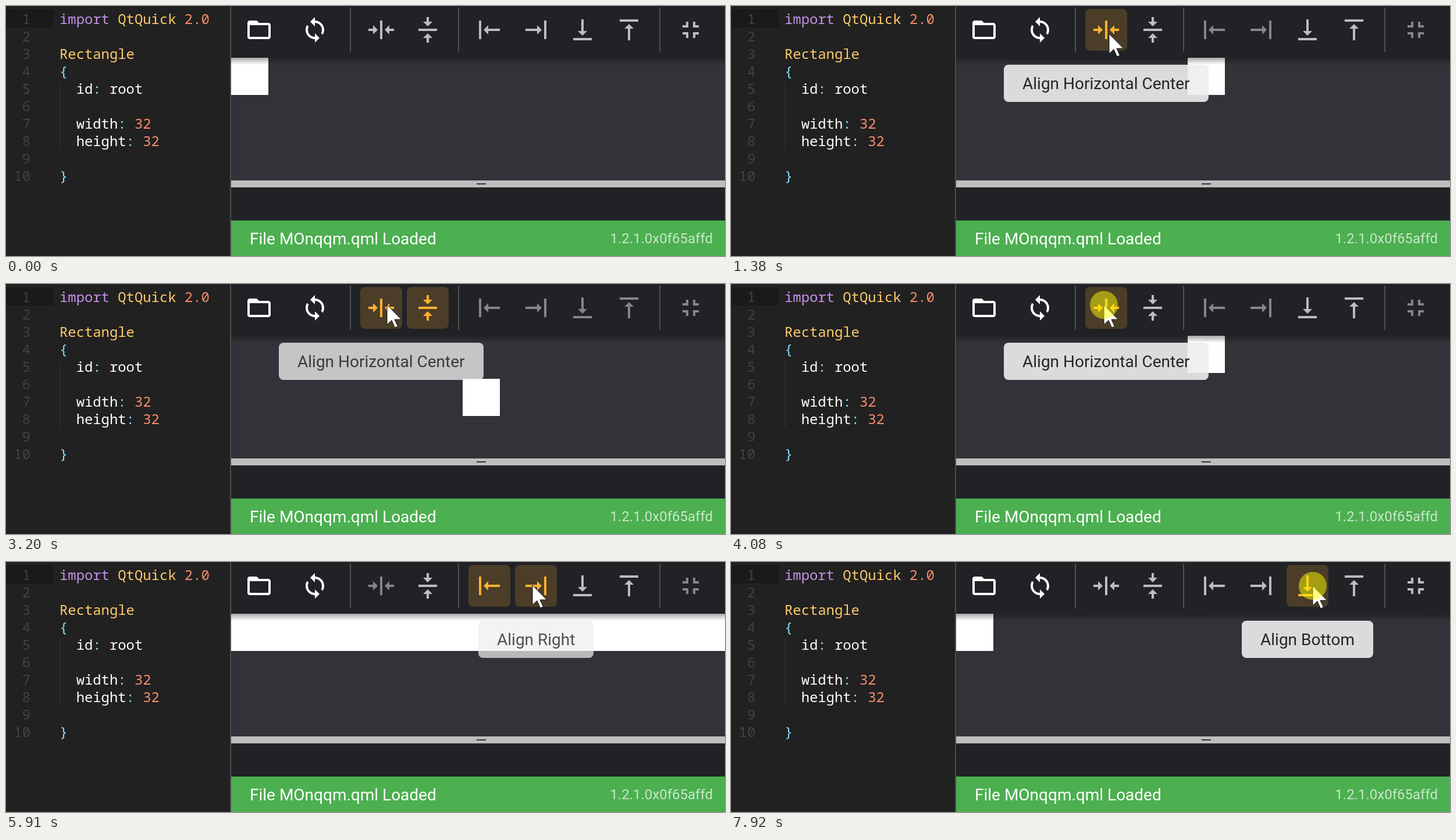
Write an HTML page with a canvas that moves like this. It is 1236x430 px and loops after 8000 ms.

```html
<!DOCTYPE html>
<html lang="en">
<head>
<meta charset="utf-8">
<title>Anchor toolbar</title>
<style>
  html, body { margin: 0; height: 100%; overflow: hidden; background: #212121; }
  canvas { display: block; }
</style>
</head>
<body>
<canvas id="stage" width="1236" height="430"></canvas>
<script>
const ctx = document.getElementById('stage').getContext('2d');
const LOOP = 8000, ENTER = 260, FRAME = 95.7;
const TRAVEL = 200, HOLD = 190, LAG = 280, FADE = 130;
const MID = 41; // toolbar centre line

const centerIcon = 'M8 19h3v4h2v-4h3l-4-4-4 4zm8-14h-3V1h-2v4H8l4 4 4-4zM4 11v2h16v-2H4z';
const edgeIcon = 'M16 13h-3V3h-2v10H8l4 4 4-4zM4 19v2h16v-2H4z';
const folderIcon = 'M20 6h-8l-2-2H4c-1.1 0-1.99.9-1.99 2L2 18c0 1.1.9 2 2 2h16c1.1 0 2-.9 2-2V8c0-1.1-.9-2-2-2zm0 12H4V8h16v10z';
const syncIcon = 'M12 4V1L8 5l4 4V6c3.31 0 6 2.69 6 6 0 1.01-.25 1.97-.7 2.8l1.46 1.46C19.54 15.03 20 13.57 20 12c0-4.42-3.58-8-8-8zm0 14c-3.31 0-6-2.69-6-6 0-1.01.25-1.97.7-2.8L5.24 7.74C4.46 8.97 4 10.43 4 12c0 4.42 3.58 8 8 8v3l4-4-4-4v3z';
const fillIcon = 'M5 16h3v3h2v-5H5v2zm3-8H5v2h5V5H8v3zm6 11h2v-3h3v-2h-5v5zm2-11V5h-2v5h5V8h-3z';
const arrow = new Path2D('M0 0V34L8 26.5L13.5 39L18.5 37L13 25H24.5Z');

// turn: quarter turns of the icon
const buttons = {
  open: { x: 435, icon: folderIcon, bright: true },
  sync: { x: 531, icon: syncIcon, bright: true },
  hc: { x: 645, icon: centerIcon, turn: 1, label: 'Align Horizontal Center' },
  vc: { x: 725, icon: centerIcon, label: 'Align Vertical Center' },
  left: { x: 831, icon: edgeIcon, turn: 1, label: 'Align Left' },
  right: { x: 911, icon: edgeIcon, turn: -1, label: 'Align Right' },
  bottom: { x: 991, icon: edgeIcon, label: 'Align Bottom' },
  top: { x: 1071, icon: edgeIcon, turn: 2 },
  fill: { x: 1177, icon: fillIcon }
};
for (const b of Object.values(buttons)) b.shape = new Path2D(b.icon);

// Pointer stops: place, offset from its centre, arrival, press
const visits = [
  ['view', 44, 188, ENTER],
  ['hc', 5, 7, 640, 810],
  ['vc', -5, -8, 1780, 2150],
  ['view', -140, 231, 2560],
  ['hc', 10, -5, 3200],
  ['vc', -5, -1, 3440, 3500],
  ['hc', -4, -5, 3890, 4080],
  ['left', 15, -20, 4660, 4850],
  ['right', -6, -1, 5430, 5520],
  ['left', 19, 1, 6110, 6285],
  ['right', -8, 4, 6810, 6955],
  ['bottom', 9, 0, 7630, 7910]
].map(([name, dx, dy, arrive, press]) => ({
  name, arrive, press, y: MID + dy,
  x: dx + (name === 'view' ? 817 : buttons[name].x)
}));

const W = '#ffffff', P = '#c792ea', Y = '#ffcb6b', O = '#f78c6c', B = '#89ddff';
const code = [
  [['import ', P], ['QtQuick ', Y], ['2.0', O]],
  [],
  [['Rectangle', Y]],
  [['{', B]],
  [['  id', W], [': ', B], ['root', W]],
  [],
  [['  width', W], [': ', B], ['32', O]],
  [['  height', W], [': ', B], ['32', O]],
  [],
  [['}', B]]
];

const clamp = v => Math.max(0, Math.min(1, v));
const smooth = k => k * k * (3 - 2 * k);

function box(x, y, w, h, color) {
  ctx.fillStyle = color;
  ctx.fillRect(x, y, w, h);
}

function roundBox(x, y, w, h, color) {
  ctx.fillStyle = color;
  ctx.beginPath();
  ctx.roundRect(x, y, w, h, 8);
  ctx.fill();
}

function text(str, x, y, color, font, align = 'left') {
  ctx.font = font;
  ctx.textAlign = align;
  ctx.fillStyle = color;
  ctx.fillText(str, x, y);
}

// Every press toggles its button
const toggled = (name, t) =>
  visits.filter(v => v.name === name && v.press <= t).length % 2 === 1;

function pointer(t) {
  let { x, y } = visits[0];
  for (const v of visits.slice(1)) {
    const k = smooth(clamp((t - v.arrive) / TRAVEL + 1));
    x += (v.x - x) * k;
    y += (v.y - y) * k;
  }
  return [x, y];
}

function drawEditor() {
  const mono = '500 23.88px "Noto Sans Mono", monospace';
  box(0, 0, 385, 430, '#212121');
  box(0, 6, 82, 31, '#1a1a1a');
  box(92, 132, 2, 115, '#2b2b2b');
  code.forEach((line, i) => {
    const y = 31 + 30 * i;
    text(i + 1, 42, y, '#424242', mono, 'right');
    let x = 92;
    for (const [str, color] of line) {
      text(str, x, y, color, mono);
      x += ctx.measureText(str).width;
    }
  });
  box(385, 0, 2, 430, '#4c4c4d');
}

function drawView(set) {
  box(387, 89, 849, 211, '#323338');
  const x = set.hc ? 785 : set.right && !set.left ? 1183 : 387;
  const w = set.left && set.right ? 860 : 64;
  box(x, set.vc ? 163 : 89, w, 64, '#fff');
  const shade = ctx.createLinearGradient(0, 89, 0, 101);
  shade.addColorStop(0, 'rgba(0,0,0,.34)');
  shade.addColorStop(1, 'rgba(0,0,0,0)');
  box(387, 89, 849, 12, shade);
  box(387, 300, 849, 12, '#bdbdbd');
  box(809, 305, 16, 2, '#323338');
  box(387, 312, 849, 57, '#212226');
  box(387, 369, 849, 61, '#4caf50');
  text('File MOnqqm.qml Loaded', 419, 410, '#fff', '28px Roboto, sans-serif');
  text('1.2.1.0x0f65affd', 1215, 408, 'rgba(255,255,255,.7)', '24px Roboto, sans-serif', 'right');
}

function drawToolbar(t, set) {
  const sides = set.left || set.right;
  const dim = {
    hc: sides, left: set.hc, right: set.hc, top: set.vc, bottom: set.vc,
    fill: sides || set.hc || set.vc
  };
  const [px, py] = pointer(t - 100);
  box(387, 0, 849, 89, '#212226');
  for (const x of [591, 777, 1123]) box(x, 3, 2, 76, '#4f5053');
  for (const [name, b] of Object.entries(buttons)) {
    const checked = set[name] || toggled(name, t);
    const hover = Math.abs(px - b.x) < 36 && Math.abs(py - MID) < 36;
    if (checked || hover) roundBox(b.x - 36, 5, 72, 72, checked ? '#4b3d28' : '#37383c');
    ctx.save();
    ctx.translate(b.x, MID);
    ctx.rotate((b.turn || 0) * Math.PI / 2);
    ctx.scale(2, 2);
    ctx.translate(-12, -12);
    ctx.fillStyle = checked ? '#ffb12f' : `rgba(255,255,255,${b.bright ? 1 : dim[name] ? 0.45 : 0.7})`;
    ctx.fill(b.shape);
    ctx.restore();
  }
}

function drawTips(t) {
  const font = '28px Roboto, sans-serif';
  visits.forEach(({ name, arrive }, i) => {
    const next = visits[i + 1]?.arrive ?? Infinity;
    const alpha = Math.min(clamp((t - arrive + 140) / FADE), clamp((next - 100 - t) / FADE));
    if (!alpha || name === 'view') return;
    const { x, label } = buttons[name];
    ctx.font = font;
    const half = Math.round(ctx.measureText(label).width / 2) + 32;
    ctx.globalAlpha = alpha * 0.9;
    roundBox(x - half, 101, half * 2, 64, '#eee');
    ctx.globalAlpha = alpha;
    text(label, x - half + 32, 143, '#252526', font);
    ctx.globalAlpha = 1;
  });
}

function drawPointer(t) {
  if (t < ENTER) return;
  ctx.save();
  ctx.translate(...pointer(t));
  ctx.fillStyle = '#fff';
  ctx.strokeStyle = '#111';
  ctx.fill(arrow);
  ctx.stroke(arrow);
  for (const { press } of visits) {
    const held = t - press;
    if (!(held >= 0 && held < HOLD + 80)) continue;
    const down = held < HOLD;
    ctx.fillStyle = `rgba(255,255,0,${down ? 0.5 : 0.2})`;
    ctx.beginPath();
    ctx.arc(0, 0, down ? 24 : 5, 0, 7);
    ctx.fill();
  }
  ctx.restore();
}

function draw(now) {
  // The screen refreshes at a fixed, low rate
  const t = ENTER + Math.floor((now % LOOP - ENTER) / FRAME + 0.3) * FRAME;
  // A toggled anchor takes effect a moment after the press
  const set = {};
  for (const name in buttons) set[name] = toggled(name, t - LAG);
  drawEditor();
  drawView(set);
  drawToolbar(t, set);
  drawTips(t);
  drawPointer(t);
}

const start = performance.now();
function tick() {
  draw(performance.now() - start);
  requestAnimationFrame(tick);
}
tick();
</script>
</body>
</html>
```
